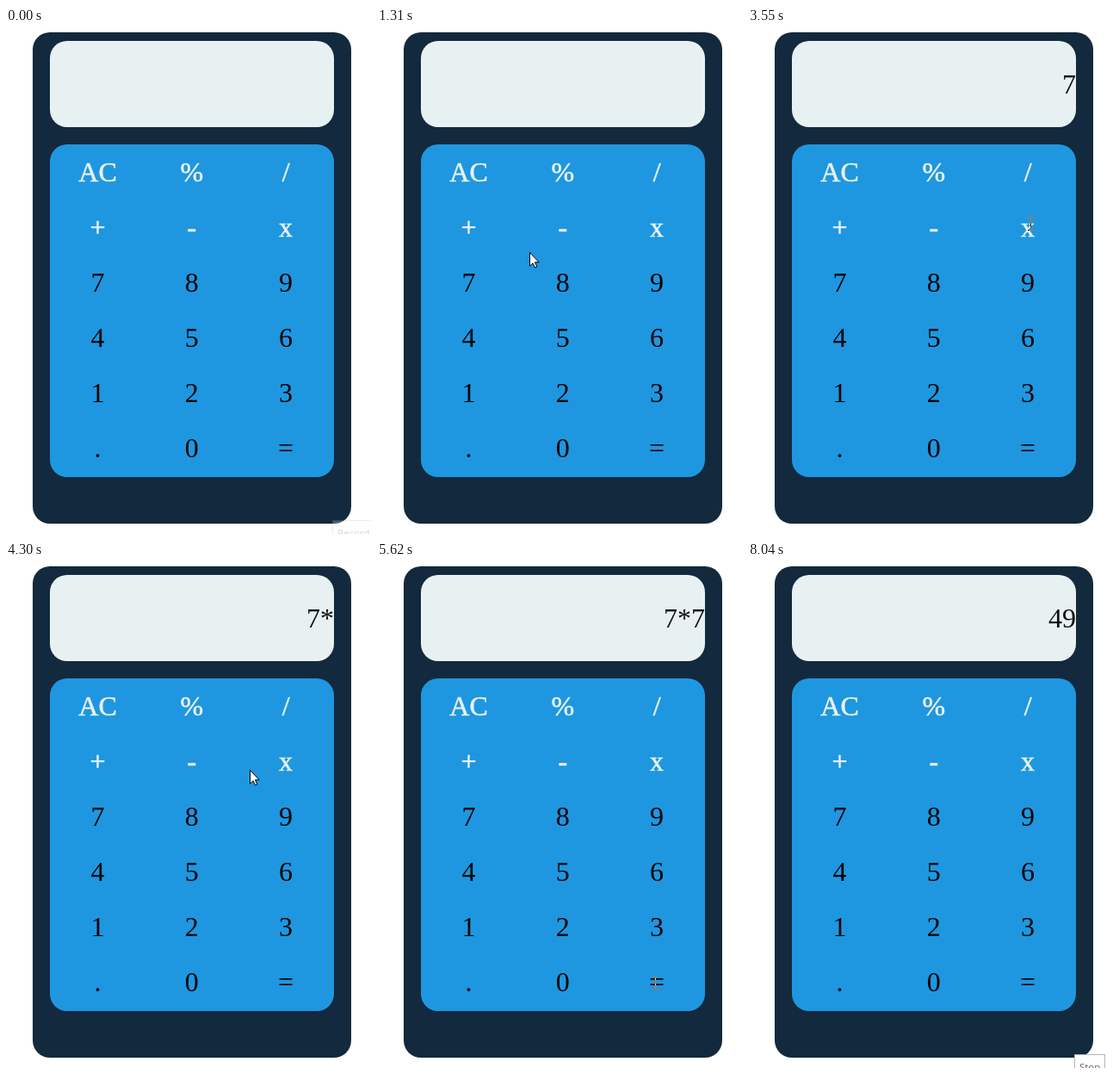
Recreate the animation shown at these times as an HTML page. Size 424 by 587 pixels, loop 8110 ms.

```html
<!DOCTYPE html>
<html lang="en">
<head>
<meta charset="utf-8">
<title>Calculator</title>
<style>
  html, body { margin: 0; width: 100%; height: 100%; overflow: hidden; background: #fff; }
  svg { display: block; }
  .serif { font: 32px "Liberation Serif", "Times New Roman", serif; }
  .light { fill: #e8f1f2; stroke: #e8f1f2; stroke-width: .6px; }
  #tipText { font: 11.5px "Open Sans", sans-serif; fill: #5c5c5c; }
  #beam { mix-blend-mode: difference; }
</style>
</head>
<body>
<svg width="424" height="587" viewBox="0 0 424 587">
  <rect width="424" height="587" fill="#fff"/>
  <rect x="31" y="5" width="370" height="570" rx="20" fill="#13293d"/>
  <rect x="51" y="15" width="330" height="100" rx="20" fill="#e8f1f2"/>
  <rect x="51" y="135" width="330" height="386" rx="20" fill="#1e97e0"/>
  <g id="keys" class="serif" text-anchor="middle"></g>
  <text id="out" class="serif" x="381" y="76" text-anchor="end" fill="#111"></text>
  <g id="tip">
    <rect id="tipBox" x="379.5" y="571.5" height="24" fill="#fff" stroke="#b5b5b5"/>
    <text id="tipText" x="385" y="590"></text>
  </g>
  <path id="beam" d="M-3 -7.5H0M1 -7.5H4M.5 -7V7M-3 7.5H0M1 7.5H4" fill="none" stroke="#fff" shape-rendering="crispEdges"/>
  <path id="arrow" d="M.5 .5V16.2L4.1 12.8L6.5 18L8.8 17L6.5 11.8H11.2Z" fill="#fff" stroke="#000"/>
  <circle id="halo" r="12" fill="#ff0" opacity=".5"/>
</svg>
<script>
const LOOP = 8110;
const PRESS = 70;    // how long a click lasts
const REACH = 700;   // travel time from key to key
const LEG = 400;     // time per leg of the opening wander
const $ = id => document.getElementById(id);
const show = (el, on) => el.setAttribute("display", on ? "inline" : "none");
const clamp = v => Math.min(1, Math.max(0, v));
const smooth = k => (1 - Math.cos(Math.PI * k)) / 2;

// Keypad
const keys = "AC % / + - x 7 8 9 4 5 6 1 2 3 . 0 =".split(" ").map((label, i) => {
  const row = Math.floor(i / 3);
  const x = 106.5 + (i % 3) * 109.3, y = 178 + row * 64;
  const el = document.createElementNS("http://www.w3.org/2000/svg", "text");
  el.setAttribute("x", x);
  el.setAttribute("y", y);
  if (row < 2) el.setAttribute("class", "light");
  el.textContent = label;
  $("keys").append(el);
  return { label, x, y: y - 10, half: el.getComputedTextLength() / 2 };
});

// Each click: arrival and press time, key, offset from its centre, resulting text
const clicks = [
  { arrive: 2070, press: 2730, key: "7", dx: 1, dy: 11, text: "7" },
  { arrive: 3550, press: 3750, key: "x", dx: 3, dy: -5, text: "7*" },
  { arrive: 4790, press: 4920, key: "7", dx: 3, dy: -3, text: "7*7" },
  { arrive: 5690, press: 5890, key: "=", dx: 3, dy: 5, text: "49" }
];

// Pointer moves, in order: a wander to the first key, the other keys, the way out
const wander = [[372, 570], [297, 415], [225, 238], [178, 256], [167, 294]];
const stops = wander.map(([x, y], i) => ({ t: 70 + i * LEG, x, y, travel: LEG, ease: k => k }));
clicks.forEach((c, i) => {
  const key = keys.find(k => k.label === c.key);
  stops.push({
    t: c.arrive, x: key.x + c.dx, y: key.y + c.dy,
    travel: i ? REACH : LEG, ease: i ? smooth : k => k
  });
});
stops.push({ t: 7430, x: 370, y: 575, travel: 210, ease: k => k });

function pointer(t) {
  const i = stops.findIndex(s => s.t > t);
  if (i < 1) return null;
  const a = stops[i - 1], b = stops[i];
  const k = b.ease(clamp((t - b.t + b.travel) / b.travel));
  return { x: Math.round(a.x + (b.x - a.x) * k), y: Math.round(a.y + (b.y - a.y) * k) };
}

function drawTip(t) {
  const early = t < LOOP / 2;
  $("tip").setAttribute("opacity", early ? .25 * clamp(1 - t / 140) : clamp((t - 7820) / 210));
  $("tipBox").setAttribute("width", early ? 50 : 35);
  $("tipText").textContent = early ? "Record" : "Stop";
}

function drawPointer(t) {
  const pos = pointer(t);
  const onText = pos && keys.some(k => Math.abs(pos.x - k.x) <= k.half && Math.abs(pos.y - k.y) <= 18);
  show($("beam"), onText);
  show($("arrow"), pos && !onText);
  show($("halo"), clicks.some(c => t >= c.press && t < c.press + PRESS));
  if (pos) {
    for (const id of ["beam", "arrow", "halo"]) $(id).setAttribute("transform", `translate(${pos.x} ${pos.y})`);
  }
}

function draw(t) {
  const done = clicks.filter(c => t >= c.press + PRESS).pop();
  $("out").textContent = done ? done.text : "";
  drawPointer(t);
  drawTip(t);
}

const start = performance.now();
function tick() {
  draw((performance.now() - start) % LOOP);
  requestAnimationFrame(tick);
}
tick();
</script>
</body>
</html>
```
